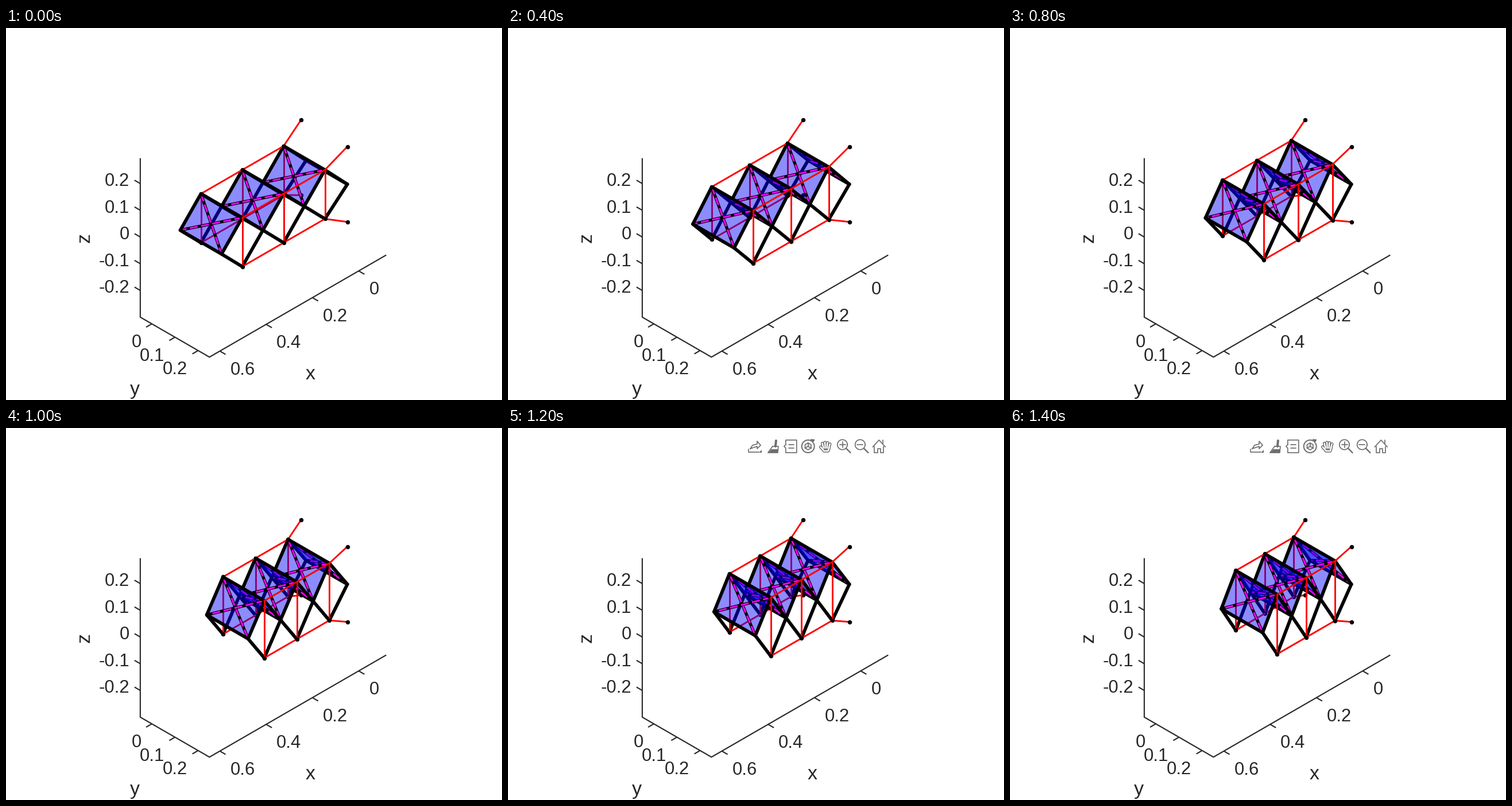
A matplotlib script that plays this animation: 864 by 648 pixels, repeating every 1.5 s.

```python
import numpy as np
import matplotlib.pyplot as plt
from matplotlib.animation import FuncAnimation
from matplotlib.patches import Polygon

W, H, N = 864, 648, 15
TOOLBAR_FROM = 11
INK = "#262626"
GRAY = "#6e6e6e"

fig = plt.figure(figsize=(W / 72, H / 72), dpi=72, facecolor="white")
ax = fig.add_axes([0, 0, 1, 1])
ax.set_xlim(0, W)
ax.set_ylim(H, 0)
ax.axis("off")

# Isometric view: 570 px per unit, seen from (1, 1, 1).
SCALE = 570
ORIGIN = np.array([514, 225.6])
BASIS = SCALE * np.array([[-np.sqrt(1 / 2), np.sqrt(1 / 6)],
                          [np.sqrt(1 / 2), np.sqrt(1 / 6)],
                          [0, -np.sqrt(2 / 3)]])
X_MIN, X_MAX = -0.119, 0.645
Y_MIN, Y_MAX = -0.05, 0.249
Z_MIN, Z_MAX = -0.3, 0.295


def project(x, y, z):
    return ORIGIN + np.array([x, y, z]) @ BASIS


def axis_line(*pts):
    ax.plot(*zip(*pts), color=INK, lw=2.1, solid_capstyle="butt", solid_joinstyle="miter")


def label(pos, s, size=31, **kw):
    ax.text(*pos, s, fontsize=size, color=INK, family="Liberation Sans",
            va="baseline", **kw)


def ticks(values, place, tick, shift, ha):
    for v in values:
        p = place(0.1 * v)
        axis_line(p, p + tick)
        label(p + shift, f"{0.1 * v:.1f}" if v else "0", ha=ha)


def draw_axes():
    axis_line(project(X_MAX, Y_MIN, Z_MAX), project(X_MAX, Y_MIN, Z_MIN),
              project(X_MAX, Y_MAX, Z_MIN), project(X_MIN, Y_MAX, Z_MIN))
    ticks(range(0, 7, 2), lambda v: project(v, Y_MAX, Z_MIN), (10, 5.8), (18, 41), "left")
    ticks(range(3), lambda v: project(X_MAX, v, Z_MIN), (-10, 5.8), (-18.5, 41), "right")
    ticks(range(-2, 3), lambda v: project(X_MAX, Y_MIN, v), (-10, -5.8), (-19, 4), "right")
    label((530, 612), "x", 34, ha="center")
    label((224, 639), "y", 34, ha="center")
    label((145.5, 365), "z", 34, ha="center", rotation=90, rotation_mode="anchor")


# Folded tube: rigid panels hang between ridges, its cells shorten steadily.
CELLS = 3
PITCH_START, PITCH_END = 0.1787, 0.1253
PANEL = 0.128
TUBE_Y = 0.2
TUBE_WIDTH = 0.1785
SHIFT_X, SHIFT_Z = 0.0075, 0.0105
ANCHOR_Z = 0.141


def vertices(i, y):
    pitch = PITCH_START + (PITCH_END - PITCH_START) * i / (N - 1)
    height = np.sqrt(PANEL ** 2 - (pitch / 2) ** 2)
    mids = [SHIFT_X + pitch * (k + 0.5) for k in range(CELLS)]
    top = [project(x, y, SHIFT_Z + height) for x in mids]
    low = [project(x, y, SHIFT_Z - height) for x in mids]
    valley = [project(0, y, 0)]
    valley += [project(x + pitch / 2, y, SHIFT_Z) for x in mids]
    return top, low, valley


class Painter:
    """Draws strictly in call order and can wipe itself."""

    def __init__(self):
        self.items = []

    def clear(self):
        for item in self.items:
            item.remove()
        self.items = []

    def line(self, *pts, color="black", lw=5.8, **kw):
        kw.setdefault("solid_capstyle", "round")
        self.items += ax.plot(*zip(*pts), color=color, lw=lw,
                              zorder=10 + len(self.items), **kw)

    def cable(self, *pts):
        self.line(*pts, color="red", lw=2.9)

    def dot(self, p):
        self.items += ax.plot(*p, "o", color="black", ms=7.5, mew=0,
                              zorder=10 + len(self.items))

    def face(self, *pts, color=(0, 0, 1, 0.45)):
        self.items.append(ax.add_patch(Polygon(
            pts, fc=color, ec="none", zorder=10 + len(self.items))))

    def brace(self, a, b):
        self.line(a, b, lw=5.2)
        self.line(a, b, color="magenta", lw=3, ls=(0, (4.6, 2)), dash_capstyle="butt")


pen = Painter()


def panel(ridge, ridge_l, valley, valley_l):
    pen.face(ridge_l, ridge, valley, valley_l)
    pen.brace(ridge_l, valley)
    pen.brace(ridge, valley_l)


def draw_structure(i):
    top, low, valley = vertices(i, TUBE_Y)
    top_l, low_l, valley_l = vertices(i, TUBE_Y - TUBE_WIDTH)
    hook_l, hook_r = project(0, 0, ANCHOR_Z), project(0, TUBE_Y, ANCHOR_Z)
    foot_l, foot_r = project(0, 0, -ANCHOR_Z), project(0, TUBE_Y, -ANCHOR_Z)

    # Cells from the far end to the near end.
    pen.cable(foot_l, low_l[0])
    pen.dot(foot_l)
    for k in range(CELLS):
        pen.line(valley_l[k], valley[k])
        pen.line(top_l[k], valley_l[k])
        panel(top[k], top_l[k], valley[k], valley_l[k])
        pen.line(valley_l[k], low_l[k], valley_l[k + 1])
        pen.cable(top_l[k], low_l[k])
        if k:
            pen.cable(low_l[k - 1], low_l[k])
        pen.dot(low_l[k])
        panel(top[k], top_l[k], valley[k + 1], valley_l[k + 1])
        pen.line(valley_l[k + 1], top_l[k], top[k])
    pen.line(valley_l[-1], valley[-1])

    # Near side.
    for k in range(CELLS):
        for tip in (top[k], low[k]):
            pen.line(valley[k], tip, valley[k + 1])
    pen.cable(hook_l, *top_l)
    pen.cable(hook_r, *top)
    pen.cable(foot_r, *low)
    for t, b in zip(top, low):
        pen.cable(t, b)
    for p in (hook_l, hook_r, foot_r, *top_l, *low):
        pen.dot(p)


def arc(r, start=0, stop=360, n=40):
    a = np.radians(np.linspace(start, stop, n))
    return np.column_stack([r * np.cos(a), r * np.sin(a)])


def icon_pen(x, y=32):
    def stroke(*pts, lw=1.7, color=GRAY):
        pen.line(*(np.array(pts) + (x, y)), color=color, lw=lw)

    def fill(*pts):
        pen.face(*(np.array(pts) + (x, y)), color=GRAY)

    return stroke, fill


def export_icon(stroke, fill):
    stroke((-11, 5), (-11, 10), (7, 10))
    stroke((-8, 4), (-4, -2), (4, -4), (4, -9), (10, -2), (4, 4), (4, 0), (-8, 4))
    fill((12, 6), (12, 11), (7, 11))


def brush_icon(stroke, fill):
    stroke((6, -10), (5, 0), lw=4)
    stroke((0, 0), (10, 0), (9, 11), (-8, 11), (0, 0))
    fill((-2, 5), (10, 5), (9, 11), (-8, 11))


def tip_icon(stroke, fill):
    stroke((-8, -3), (-8, -11), (11, -11), (11, 11), (-8, 11), (-8, 3), (-11, 0), (-8, -3))
    for y in (-3, 3):
        stroke((-3, y), (6, y))


def rotate_icon(stroke, fill):
    stroke(*arc(11, -30, 300), lw=2)
    fill((4, -13), (12, -12), (8, -5))
    cube = arc(6, 30, 390, 7)
    stroke(*cube)
    for corner in cube[1:6:2] * -1:
        stroke((0, 0), corner)


def hand_icon(stroke, fill):
    # Gray strokes with a thinner white core leave an outline.
    for lw, color in ((5.4, GRAY), (2.4, "white")):
        for j in range(4):
            stroke((-4 + 3 * j, 3), (-6 + 4.4 * j, -7 + (j - 1.3) ** 2), lw=lw, color=color)
        stroke((-9, 1), (-3, 8), (4, 8), (6, 2), lw=lw, color=color)


def zoom_icon(stroke, fill, plus):
    stroke(*(arc(8.7) + (-2, -3)))
    stroke((5, 4), (12, 11), lw=2.4)
    stroke((-7, -3), (3, -3))
    if plus:
        stroke((-2, -8), (-2, 2))


def home_icon(stroke, fill):
    stroke((-11, 1), (0, -11), (11, 1))
    stroke((7, -5), (7, -11))
    stroke((-8, 0), (-8, 11), (-2, 11), (-2, 4), (3, 4), (3, 11), (8, 11), (8, 0))


ICONS = [export_icon, brush_icon, tip_icon, rotate_icon, hand_icon,
         lambda *p: zoom_icon(*p, plus=True), lambda *p: zoom_icon(*p, plus=False),
         home_icon]


def update(i):
    pen.clear()
    draw_structure(i)
    if i >= TOOLBAR_FROM:
        for k, icon in enumerate(ICONS):
            icon(*icon_pen(430 + 30.9 * k))
    return pen.items


draw_axes()
anim = FuncAnimation(fig, update, frames=N, interval=100, repeat=True, repeat_delay=0,
                     init_func=lambda: update(0))
plt.show()
```
